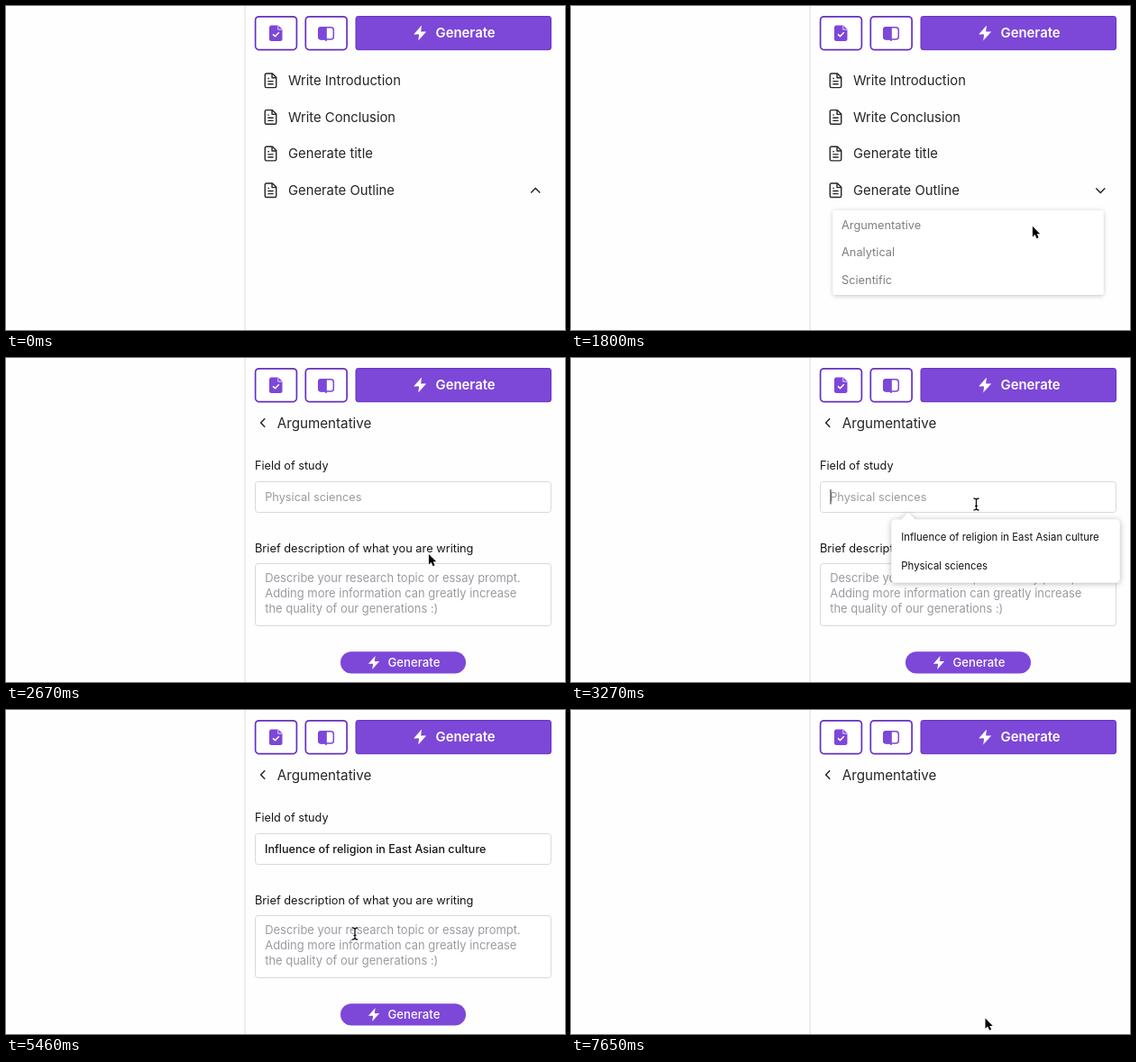
Write an HTML page with a canvas that moves like this. It is 620 px wide and 360 px high and loops after 8000 ms.

```html
<!DOCTYPE html>
<html lang="en">
<head>
<meta charset="utf-8">
<title>Outline generator</title>
<style>
  html, body { margin: 0; width: 100%; height: 100%; overflow: hidden; background: #fefefe; }
  canvas { display: block; width: 620px; height: 360px; }
</style>
</head>
<body>
<canvas id="stage"></canvas>
<script>
const W = 620, H = 360, LOOP = 8000;
const PURPLE = '#7d47d8', EDGE = '#6332c0', INK = '#252525', HINT = '#9a9aa2';

const canvas = document.getElementById('stage');
const ctx = canvas.getContext('2d');
const dpr = window.devicePixelRatio || 1;
canvas.width = W * dpr;
canvas.height = H * dpr;

// Times of the clicks and page changes
const OPEN = 1130, PICK = 2070, FOCUS = 3200, FILL = 4380, SEND = 6640;

// Pointer path: time, x, y
const path = [
  [420, 603, 262], [1080, 585.5, 211], [1260, 585.5, 211],
  [1920, 505, 248], [2300, 505, 248], [2670, 469, 218],
  [3120, 449.5, 162.5], [3930, 449.5, 162.5], [4260, 453, 200],
  [4770, 453, 200], [5400, 387, 248.5], [5820, 387, 248.5],
  [6480, 459.5, 342.5], [8000, 459.5, 342.5]
];

const clamp = v => Math.min(1, Math.max(0, v));
const ramp = (t, from, to) => clamp((t - from) / (to - from));
const easeOut = v => 1 - (1 - v) ** 3;
const easeInOut = v => v * v * (3 - 2 * v);

function slope(k, axis) {
  const a = path[k - 1], b = path[k], c = path[k + 1];
  const resting = (p, q) => !p || !q || (p[1] === q[1] && p[2] === q[2]);
  if (resting(a, b) || resting(b, c)) return 0;
  return (c[axis] - a[axis]) / (c[0] - a[0]);
}

// Smooth curve through the path, stopping wherever the pointer rests
function pointerAt(t) {
  let k = 0;
  while (k < path.length - 2 && t >= path[k + 1][0]) k++;
  const a = path[k], b = path[k + 1], d = b[0] - a[0];
  const u = ramp(t, a[0], b[0]), v = 1 - u;
  return [1, 2].map(i =>
    a[i] * v * v * (1 + 2 * u) + b[i] * u * u * (3 - 2 * u) +
    d * u * v * (v * slope(k, i) - u * slope(k + 1, i)));
}

function text(str, x, mid, size, color = INK, weight = 400) {
  ctx.font = `${weight} ${size}px Inter, sans-serif`;
  ctx.fillStyle = color;
  ctx.fillText(str, x, mid + size * 0.36);
}

function box(x, y, w, h, r, fill, stroke, width = 1) {
  ctx.beginPath();
  ctx.roundRect(x, y, w, h, r);
  paint(fill, stroke, width);
}

function paint(fill, stroke, width) {
  if (fill) { ctx.fillStyle = fill; ctx.fill(); }
  if (stroke) { ctx.strokeStyle = stroke; ctx.lineWidth = width; ctx.stroke(); }
}

function line(points, color, width) {
  ctx.beginPath();
  points.forEach(([x, y]) => ctx.lineTo(x, y));
  paint(null, color, width);
}

function at(x, y, scale, draw, angle = 0) {
  ctx.save();
  ctx.translate(x, y);
  ctx.rotate(angle);
  ctx.scale(scale, scale);
  draw();
  ctx.restore();
}

function withAlpha(alpha, draw) {
  if (alpha <= 0) return;
  ctx.save();
  ctx.globalAlpha *= alpha;
  draw();
  ctx.restore();
}

// White panel with a shadow; the second fill keeps it white while fading
function card(drawShape, blur, alpha) {
  ctx.save();
  ctx.shadowColor = `rgba(0,0,0,${alpha})`;
  ctx.shadowBlur = blur * dpr;
  ctx.shadowOffsetY = dpr;
  drawShape();
  ctx.shadowColor = 'transparent';
  ctx.globalAlpha = 1;
  drawShape();
  ctx.restore();
}

const docShape = new Path2D('M14.5 2H6a2 2 0 0 0-2 2v16a2 2 0 0 0 2 2h12a2 2 0 0 0 2-2V7.5z');
const docLines = new Path2D('M14 2v6h6M16 13H8M16 17H8M10 9H8');
const boltShape = new Path2D('M1.8-8.5L-7 1.4H-1L-2 8.5L7-1.6H.9Z');
const arrowShape = new Path2D('M0 0V11.6L2.7 9.1L4.6 13.3L6.7 12.4L4.8 8.4H8.3Z');
const beamShape = new Path2D('M-3-6.5Q0-6.5 0-4.5Q0-6.5 3-6.5M0-5V5M-3 6.5Q0 6.5 0 4.5Q0 6.5 3 6.5M-1.5 1.8H1.5');

function docIcon(x, y) {
  at(x, y, 0.78, () => {
    ctx.translate(-12, -12);
    ctx.strokeStyle = INK;
    ctx.lineWidth = 1.8;
    ctx.stroke(docShape);
    ctx.stroke(docLines);
  });
}

function bolt(x, y, scale) {
  at(x, y, scale, () => { ctx.fillStyle = '#fff'; ctx.fill(boltShape); });
}

function chevron(x, y, angle) {
  at(x, y, 1, () => line([[-5, 2.6], [0, -2.6], [5, 2.6]], INK, 1.5), angle);
}

function toolbar() {
  for (const x of [276.6, 332.3]) box(x, 11.8, 45.8, 36.8, 4, '#fff', EDGE, 1.7);

  ctx.beginPath();
  ctx.moveTo(294.5, 21.5);
  ctx.lineTo(302, 21.5);
  ctx.lineTo(306.5, 26);
  ctx.lineTo(306.5, 36.5);
  ctx.quadraticCurveTo(306.5, 39, 304, 39);
  ctx.lineTo(294.5, 39);
  ctx.quadraticCurveTo(292, 39, 292, 36.5);
  ctx.lineTo(292, 24);
  ctx.quadraticCurveTo(292, 21.5, 294.5, 21.5);
  paint(PURPLE);
  line([[301.8, 21.5], [301.8, 26.2], [306.5, 26.2]], '#fff', 0.8);
  line([[296, 31.4], [298.5, 33.8], [302.8, 29.3]], '#fff', 1.5);

  box(346.7, 23.7, 16.6, 13.2, 3, null, PURPLE, 1.5);
  box(346, 23, 9, 14.6, [3.5, 0, 0, 3.5], PURPLE);
  line([[355, 23], [355, 39]], PURPLE, 1.6);

  box(388, 11.5, 216.5, 37.2, 2.5, PURPLE, EDGE, 1);
  bolt(459.2, 30, 1);
  text('Generate', 476.5, 30, 14.9, '#fff', 600);
}

function list(t) {
  const rows = ['Write Introduction', 'Write Conclusion', 'Generate title', 'Generate Outline'];
  const leave = easeOut(ramp(t, PICK, 2230));
  const turn = easeInOut(ramp(t, OPEN, 1345)) * (1 - ramp(t, PICK, 2200));
  withAlpha(1 - ramp(t, PICK, 2295), () => {
    ctx.translate(-20 * leave, 0);
    rows.forEach((row, i) => {
      const y = 82.8 + i * 40.65;
      docIcon(293.5, y);
      text(row, 313, y, 14.8);
    });
    chevron(587.3, 205, Math.PI * turn);
    withAlpha(ramp(t, OPEN - 60, 1270) * (1 - ramp(t, PICK, 2150)), menu);
  });
}

function menu() {
  card(() => box(290.5, 227, 300, 94, 2, '#fff'), 5, 0.24);
  ['Argumentative', 'Analytical', 'Scientific'].forEach((item, i) =>
    text(item, 300, 243 + i * 30.7, 12.8, '#7f7f7f'));
}

function header() {
  line([[287.2, 67.2], [282.6, 72], [287.2, 76.8]], INK, 1.5);
  text('Argumentative', 300.7, 72.2, 15.2);
}

function form(t) {
  const filled = t >= FILL;
  text('Field of study', 276, 119.7, 12.7, '#151515');
  box(276.5, 137.5, 328, 34, 3, '#fff', '#d9d9dd');
  if (filled) text('Influence of religion in East Asian culture', 287, 154.3, 12.6, '#151515', 500);
  else text('Physical sciences', 287.2, 154.3, 12.75, HINT);
  if (t >= FOCUS && t < 3690) line([[288, 146], [288, 162.5]], '#222', 1);

  text('Brief description of what you are writing', 276, 211.2, 12.8, '#151515');
  box(276.5, 228.5, 328, 69, 3, '#fff', '#d9d9dd');
  ['Describe your research topic or essay prompt.',
   'Adding more information can greatly increase',
   'the quality of our generations :)'
  ].forEach((row, i) => text(row, 287.2, 244.3 + i * 17.1, 12.95, HINT));

  box(371, 326.3, 139, 24.2, 12.1, PURPLE);
  bolt(408, 338.4, 0.88);
  text('Generate', 423.5, 338.4, 13.2, '#fff', 500);

  if (t >= FOCUS && t < FILL) suggestions();
}

function suggestions() {
  card(() => {
    ctx.beginPath();
    ctx.roundRect(355.5, 179.5, 253, 70, 4);
    ctx.moveTo(366, 180);
    ctx.lineTo(374, 172);
    ctx.lineTo(382, 180);
    paint('#fff');
  }, 7, 0.3);
  text('Influence of religion in East Asian culture', 366.3, 199.2, 11.4, '#111');
  text('Physical sciences', 366.3, 230.8, 11.4, '#111');
}

function pointer(t) {
  if (t < path[0][0]) return;
  const [x, y] = pointerAt(t);
  const inField = x > 276 && x < 605 && ((y > 137 && y < 172) || (y > 228 && y < 298));
  const beam = inField && t > 2600 && t < SEND;
  at(x, y, 1, () => {
    const shape = beam ? beamShape : arrowShape;
    ctx.strokeStyle = '#fff';
    ctx.lineWidth = beam ? 3 : 2;
    ctx.stroke(shape);
    if (beam) {
      ctx.strokeStyle = '#111';
      ctx.lineWidth = 1.3;
      ctx.stroke(shape);
    } else {
      ctx.fillStyle = '#000';
      ctx.fill(shape);
    }
  });
}

function render(t) {
  ctx.setTransform(dpr, 0, 0, dpr, 0, 0);
  ctx.lineJoin = 'round';
  ctx.fillStyle = '#fefefe';
  ctx.fillRect(0, 0, W, H);
  ctx.fillStyle = '#e3e3e3';
  ctx.fillRect(264.5, 0, 1.2, H);
  toolbar();
  list(t);
  const enter = ramp(t, 2310, 2600);
  withAlpha(enter, header);
  withAlpha(enter * (1 - ramp(t, SEND, 7000)), () => form(t));
  pointer(t);
}

const start = performance.now();
function tick() {
  render((performance.now() - start) % LOOP);
  requestAnimationFrame(tick);
}
tick();
</script>
</body>
</html>
```
